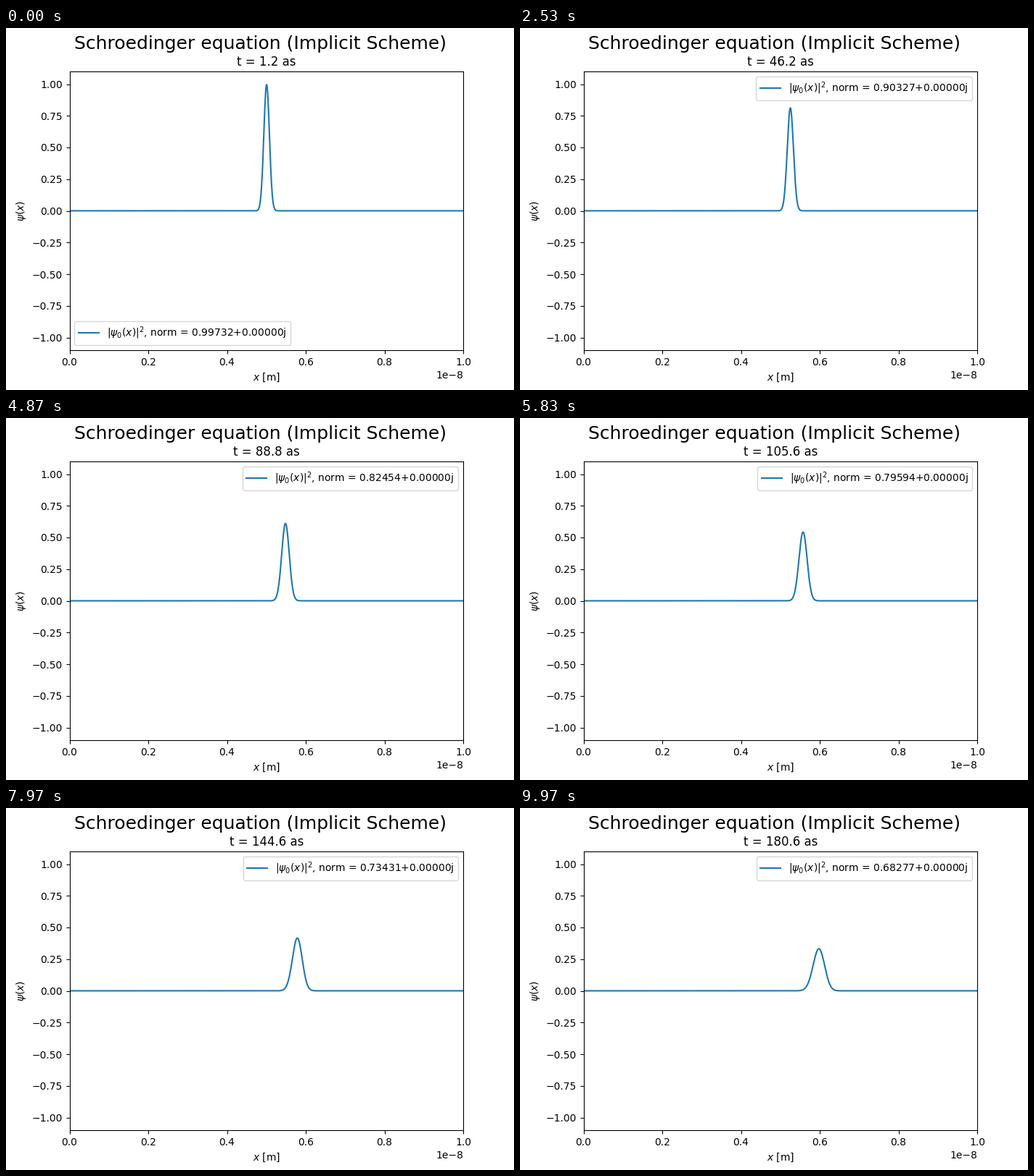
A matplotlib script for the animation above (10 s loop, 700x500 px).

```python
import numpy as np
import matplotlib.pyplot as plt
from matplotlib.animation import FuncAnimation

HBAR = 1.054571817e-34
MASS = 9.1093e-31
LENGTH = 1e-8
SIGMA = 1e-10       # packet width
K0 = 5e10           # mean wave number
DT = 1e-19          # 0.1 as per implicit step
STEPS = 6           # implicit steps per frame
FRAMES = 300
LOOP_MS = 10000

x = np.linspace(0, LENGTH, 1001)
dx = x[1] - x[0]
psi0 = np.exp(-((x - LENGTH / 2) / SIGMA) ** 2 / 2 + 1j * K0 * x)
norm0 = np.sum(np.abs(psi0) ** 2)

# Backward Euler is diagonal in Fourier space for the three-point Laplacian.
spectrum = np.fft.fft(psi0)
theta = 2 * np.pi * np.fft.fftfreq(x.size)
omega = HBAR / (MASS * dx ** 2) * (1 - np.cos(theta))
step_factor = 1 / (1 + 1j * omega * DT)


def density(steps):
    return np.abs(np.fft.ifft(spectrum * step_factor ** steps)) ** 2


fig, ax = plt.subplots(figsize=(7, 5), dpi=100)
fig.suptitle("Schroedinger equation (Implicit Scheme)", fontsize=18)
line, = ax.plot(x, density(0), label=r"$|\psi_0(x)|^2$")
ax.set_xlim(0, LENGTH)
ax.set_ylim(-1.1, 1.1)
ax.set_xlabel(r"$x$ [m]")
ax.set_ylabel(r"$\psi(x)$")
title = ax.set_title("")
legend_text = ax.legend(loc="best").get_texts()[0]


def update(frame):
    steps = STEPS * (frame + 2)
    prob = density(steps)
    norm = np.sum(prob) / norm0
    line.set_ydata(prob)
    title.set_text(f"t = {steps * DT * 1e18:.1f} as")
    legend_text.set_text(rf"$|\psi_0(x)|^2$, norm = {norm:.5f}+0.00000j")
    return line, title, legend_text


anim = FuncAnimation(fig, update, frames=FRAMES, interval=LOOP_MS / FRAMES,
                     repeat=True, repeat_delay=0)
plt.show()
```
